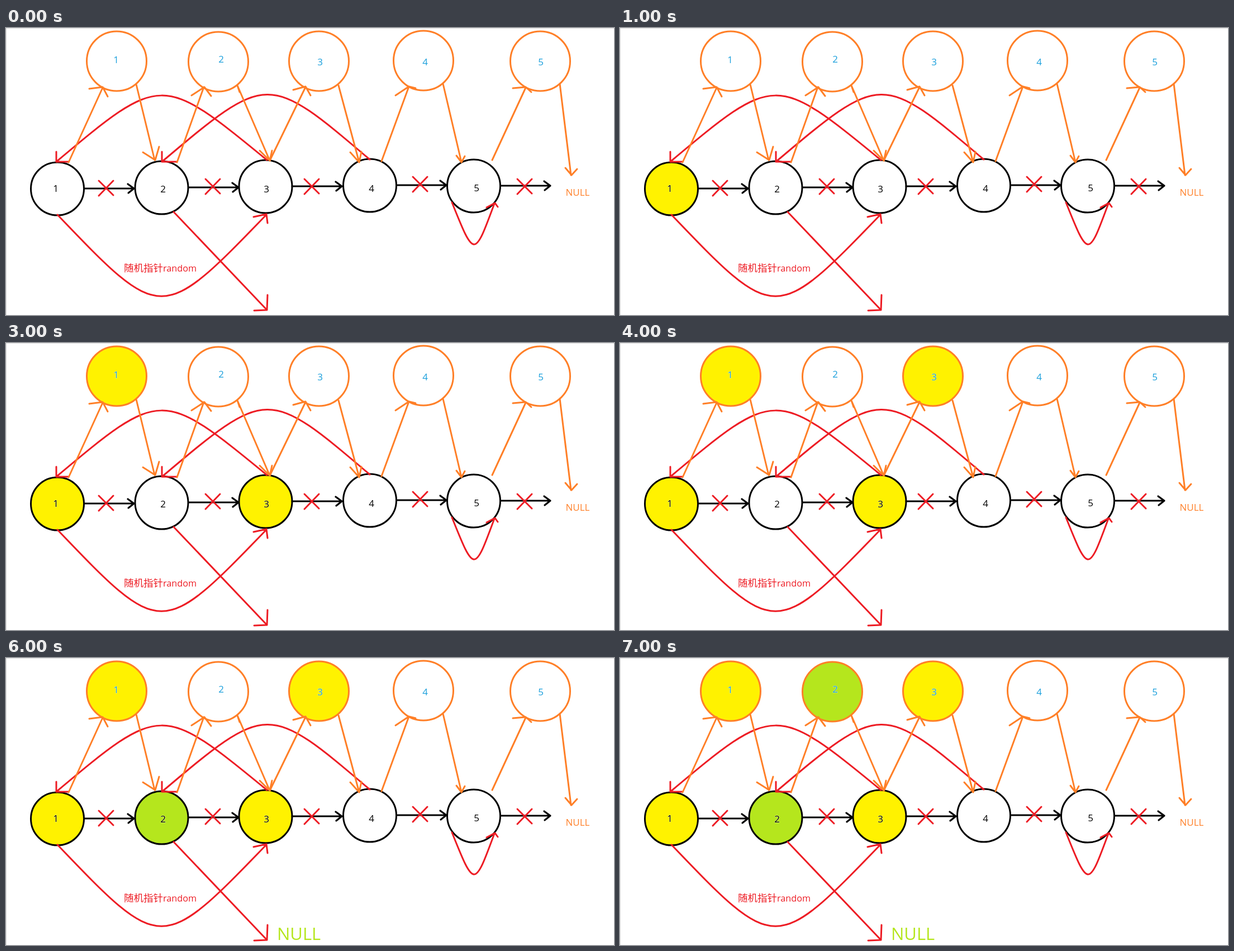
Recreate the animation shown at these times as an HTML page. Size 1088x515 px, loop 8 s.

```html
<!DOCTYPE html>
<html lang="zh">
<head>
<meta charset="utf-8">
<title>Linked list copy</title>
<style>
html, body { margin: 0; width: 100%; height: 100%; overflow: hidden; background: #fff; }
svg { display: block; width: 100%; height: 100%; }
path, .ring { fill: none; stroke-width: 3; stroke-linecap: round; stroke-linejoin: round; }
text { font-family: "Open Sans", "Noto Sans", "Noto Sans CJK SC", sans-serif; font-size: 17px; }
.digit { text-anchor: middle; paint-order: stroke; stroke: #fff; stroke-width: 1px; stroke-opacity: .6; }
</style>
</head>
<body>
<svg id="stage" viewBox="0 0 1088 515"></svg>
<script>
const LOOP = 8000;
const BLACK = '#000', RED = '#ed1c24', ORANGE = '#ff7f27', BLUE = '#1a9fdc';
const YELLOW = '#fff200', LIME = '#b5e61d';
const stage = document.getElementById('stage');

function add(tag, attrs, text) {
  const el = document.createElementNS('http://www.w3.org/2000/svg', tag);
  for (const k in attrs) el.setAttribute(k, attrs[k]);
  if (text) el.textContent = text;
  stage.append(el);
  return el;
}
const line = (d, stroke, width = 3) => add('path', { d, stroke, style: `stroke-width:${width}px` });

// Hidden until the given time, then shown until the loop ends
function showAt(el, ms) {
  const offset = ms / LOOP;
  el.animate([
    { opacity: 0, offset: 0 }, { opacity: 0, offset },
    { opacity: 1, offset }, { opacity: 1, offset: 1 }
  ], { duration: LOOP, iterations: Infinity });
}

// Centre, digit position, then fill colour and time
const copies = [
  [198, 59.5, 197, 57, YELLOW, 3000],
  [380, 60.5, 385, 56, LIME, 7000],
  [560, 59.5, 562, 61, YELLOW, 4000],
  [747, 58.5, 750, 61],
  [956, 59.5, 957, 61]
];
const nodes = [
  [92, 288.5, 89, 288, YELLOW, 1000],
  [278.5, 286.5, 281, 289, LIME, 5000],
  [464.5, 284.5, 466, 289, YELLOW, 2000],
  [651, 282.5, 654, 288],
  [837, 283.5, 842, 287]
];

function drawRow(row, r, ring, ink) {
  row.forEach(([cx, cy, tx, ty, fill, ms], i) => {
    if (fill) showAt(add('circle', { cx, cy, r, fill }), ms);
    add('circle', { cx, cy, r, stroke: ring, class: 'ring' });
    add('text', { x: tx, y: ty + 6, fill: ink, class: 'digit' }, String(i + 1));
  });
}

add('path', { d: 'M0 .5H1088M.5 0V515', stroke: '#dedede', style: 'stroke-width:1px' });
drawRow(copies, 53.5, ORANGE, BLUE);
drawRow(nodes, 47.5, BLACK, BLACK);

// Next pointers and the crosses over them
const links = [
  [140, 288, 179, 287], [327, 286, 370, 284], [512, 284, 547, 284],
  [699, 282, 741, 280], [885, 283, 928, 284]
];
for (const [x, y, cx, cy] of links) {
  line(`M${x} ${y}h88m-10 -8l11 8l-10 8`, BLACK, 3.2);
  line(`M${cx - 13} ${cy - 13}l26 26m0 -26l-26 27`, RED);
}

// Random pointers
[
  'M92 335C278 530 278 530 466 335M443 339L466 334L468 350',
  'M467 237C278 82 278 82 90 240M90 222V240H112',
  'M651 236C468 80 468 80 279 240M279 222V240H305',
  'M300 330L467 506M468 479L467 506L444 507',
  'M798 313C838 413 838 413 874 315M860 322L875 314L880 321'
].forEach(d => line(d, RED));

// Interleaved pointers
[
  'M112 241L173 107M149 109L173 106L182 123',
  'M233 101L266 237M245 223L267 237L274 213',
  'M306 241L354 106M332 121L355 106L367 122',
  'M414 103L472 238M414 103L418 115M454 220L472 238L476 220',
  'M472 238L536 106M514 111L536 105L545 121',
  'M595 103L632 241M616 223L632 241L636 222',
  'M672 239L721 105M697 121L721 105L733 108',
  'M782 100L815 241M806 229L815 241L821 230',
  'M870 237L930 107M907 108L930 106L940 115',
  'M991 100L1011 264M1001 251L1012 264L1022 253'
].forEach(d => line(d, ORANGE));

add('text', { x: 1001.5, y: 301, fill: ORANGE }, 'NULL');
add('text', { x: 211, y: 437, fill: RED, style: 'font-size:17.5px' }, '随机指针');
add('text', { x: 281, y: 437, fill: RED, style: 'font-size:16.2px' }, 'random');
showAt(add('text', { x: 485, y: 506, fill: LIME, style: 'font-size:31px' }, 'NULL'), 6000);
</script>
</body>
</html>
```
